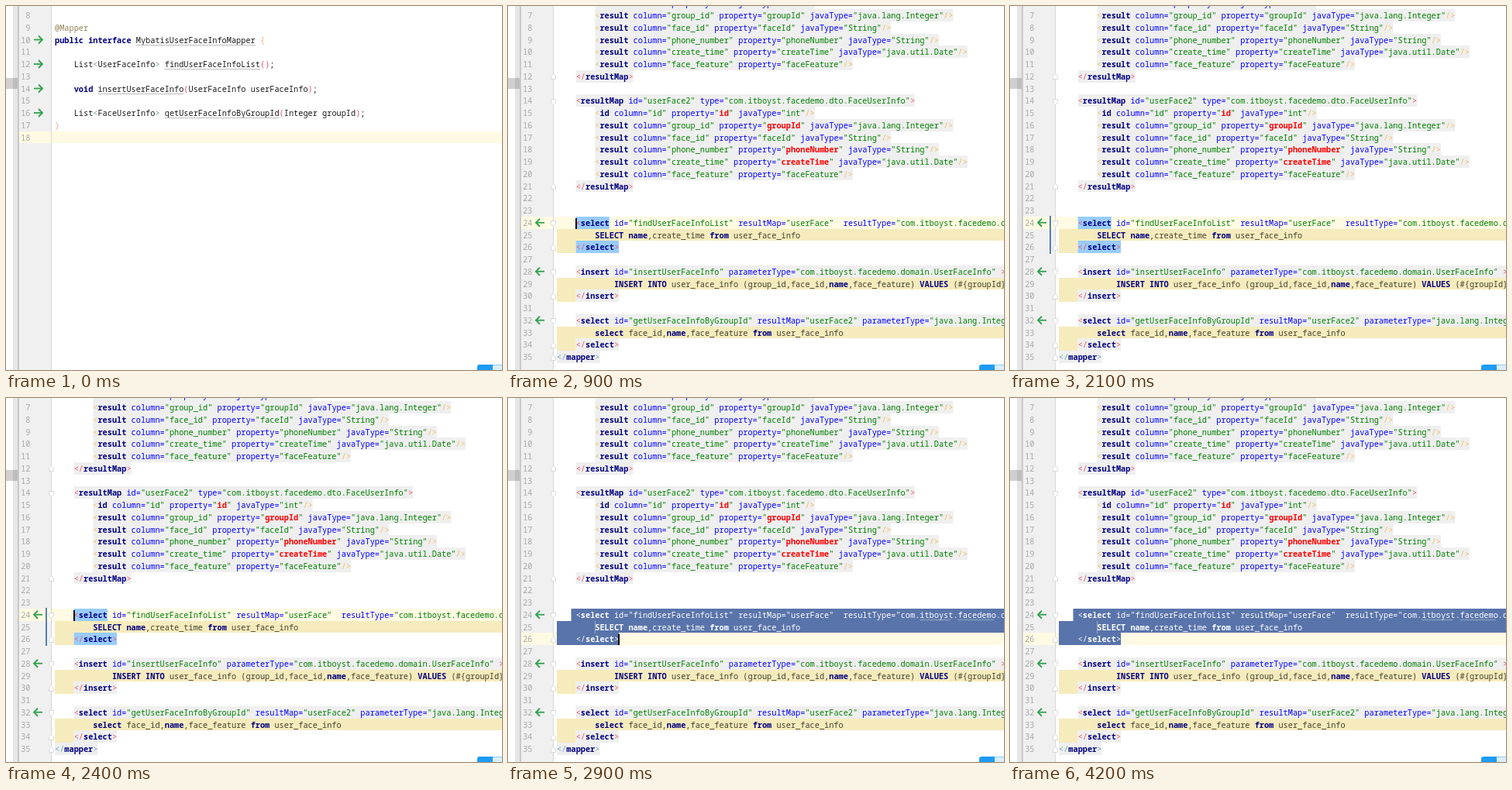
Write an HTML page with a canvas that moves like this. It is 640 px wide and 470 px high and loops after 4300 ms.

```html
<!DOCTYPE html>
<html lang="en">
<head>
<meta charset="utf-8">
<title>Mapper editor</title>
<style>
html, body { margin: 0; width: 100%; height: 100%; overflow: hidden; background: #fff; }
canvas { display: block; width: 640px; height: 470px; }
</style>
</head>
<body>
<canvas id="stage" width="640" height="470"></canvas>
<script>
const ctx = document.getElementById('stage').getContext('2d');
const LOOP = 4300, LEFT = 63, CHAR = 6.162, LINE = 15.75;
const FONT = '10.27px "Noto Sans Mono", "DejaVu Sans Mono", monospace';
const COLOR = {
  caretRow: '#fffae3', tag: '#efefef', sql: '#f6ebbc', match: '#99ccff', selection: '#5974ab',
  key: '#000080', attr: '#0000ff', value: '#008000', bad: '#ff0000', text: '#1c1c1c',
  paren: '#e0506e', brace: '#f7a58c', angle: '#6f9f83', note: '#94855a', arrow: '#2fa24b'
};

const java = {
  first: 8,
  arrows: [10, 12, 14, 16],
  lines: [
    '', '@Mapper', 'public interface MybatisUserFaceInfoMapper {', '',
    '    List<UserFaceInfo> findUserFaceInfoList();', '',
    '    void insertUserFaceInfo(UserFaceInfo userFaceInfo);', '',
    '    List<FaceUserInfo> getUserFaceInfoByGroupId(Integer groupId);', '}', ''
  ]
};

const result = (name, property, type) =>
  `        <result column="${name}" property="${property}"${type ? ` javaType="${type}"` : ''}/>`;
const fields = [
  result('group_id', 'groupId', 'java.lang.Integer'),
  result('face_id', 'faceId', 'String'),
  result('phone_number', 'phoneNumber', 'String'),
  result('create_time', 'createTime', 'java.util.Date'),
  result('face_feature', 'faceFeature')
];
const xml = {
  first: 7,
  arrows: [24, 28, 32],
  unresolved: [15, 16, 18, 19],
  foldStarts: [14, 24, 28, 32],
  foldEnds: [12, 21, 26, 30, 34, 35],
  lines: [
    ...fields, '    </resultMap>', '',
    '    <resultMap id="userFace2" type="com.itboyst.facedemo.dto.FaceUserInfo">',
    '        <id column="id" property="id" javaType="int"/>',
    ...fields, '    </resultMap>', '', '',
    '    <select id="findUserFaceInfoList" resultMap="userFace"  resultType="com.itboyst.facedemo.dto.FaceUserInfo">',
    '        SELECT name,create_time from user_face_info',
    '    </select>', '',
    '    <insert id="insertUserFaceInfo" parameterType="com.itboyst.facedemo.domain.UserFaceInfo" >',
    '            INSERT INTO user_face_info (group_id,face_id,name,face_feature) VALUES (#{groupId},#{faceId})',
    '    </insert>', '',
    '    <select id="getUserFaceInfoByGroupId" resultMap="userFace2" parameterType="java.lang.Integer">',
    '        select face_id,name,face_feature from user_face_info',
    '    </select>', '</mapper>'
  ]
};

// Drag selection: [time, row, column of its moving end]
const SELECT_FROM = { row: 17, col: 3 };
const DRAG = [[2600, 17, 3], [2700, 18, 9], [2800, 19, 11], [2900, 19, 13]];

const colX = col => LEFT + col * CHAR;
const rowTop = row => Math.round(4.1 + LINE * row);
const rowMid = row => 12.5 + LINE * row;
const baseline = row => Math.round(16 + LINE * row);
const within = (t, from, to) => t >= from && t < to;

function box(x, y, w, h, color) {
  ctx.fillStyle = color;
  ctx.fillRect(x, y, w, h);
}

function rowBox(row, x1, x2, color) {
  box(x1, rowTop(row), x2 - x1, rowTop(row + 1) - rowTop(row), color);
}

function stroke(points, color, width = 1) {
  ctx.beginPath();
  points.forEach(([x, y]) => ctx.lineTo(x, y));
  ctx.strokeStyle = color;
  ctx.lineWidth = width;
  ctx.stroke();
}

function write(text, x, y, color, bold) {
  ctx.font = (bold ? 'bold ' : '') + FONT;
  ctx.fillStyle = color;
  ctx.fillText(text, x, y);
}

// Splits a line into { text, col, color, bold, underline } pieces.
function tokenize(line, pattern, style) {
  return [...line.matchAll(pattern)].map(m => ({ text: m[0], col: m.index, ...style(m[0], m.index) }));
}

function javaTokens(line) {
  return tokenize(line, /@?\w+|[^\w\s]/g, word => {
    if (/^(public|interface|void)$/.test(word)) return { color: COLOR.key, bold: true };
    if (word[0] === '@') return { color: COLOR.note };
    if (/[{}]/.test(word)) return { color: COLOR.brace };
    if (/[()]/.test(word)) return { color: COLOR.paren };
    if (/[<>]/.test(word)) return { color: COLOR.angle };
    return { color: COLOR.text, underline: /^(Mybatis|find|insert|get)/.test(word) };
  });
}

function sqlTokens(line) {
  return tokenize(line, /INSERT INTO|\w+|[^\w\s]/g, word =>
    /^(select|insert into|from|values|name)$/i.test(word)
      ? { color: COLOR.key, bold: true } : { color: '#45402f' });
}

function xmlTokens(line, unresolved) {
  const bracket = { 0: '#6fa3c4', 4: '#ee5566', 8: '#f2bd62' }[line.search(/\S/)];
  let isProperty = false;
  return tokenize(line, /<\/?|\/?>|\w+=|"|[\w.]+/g, (word, at) => {
    if (/[<>]/.test(word)) return { color: bracket };
    if (word.endsWith('=')) {
      isProperty = word === 'property=';
      return { color: COLOR.attr };
    }
    if (/[</]/.test(line[at - 1])) return { color: COLOR.key, bold: true };
    if (unresolved && isProperty && word !== '"') return { color: COLOR.bad, bold: true };
    return { color: COLOR.value };
  });
}

java.tokens = java.lines.map(javaTokens);
xml.tokens = xml.lines.map((line, row) =>
  /^\s*</.test(line) ? xmlTokens(line, xml.unresolved.includes(row + xml.first)) : sqlTokens(line));

function drawText(doc, color) {
  doc.tokens.forEach((tokens, row) => tokens.forEach(token => {
    write(token.text, colX(token.col), baseline(row), color || token.color, token.bold);
    if (token.underline)
      box(colX(token.col), baseline(row) + 2, token.text.length * CHAR, 1, '#b9b9b9');
  }));
}

function drawArrow(row, dir) {
  const y = rowMid(row) - 0.5, tip = 41.5 + 5.5 * dir, tail = 41.5 - 5.5 * dir;
  stroke([[tail, y], [tip - dir, y]], COLOR.arrow, 1.8);
  stroke([[tip - 5 * dir, y - 5], [tip, y], [tip - 5 * dir, y + 5]], COLOR.arrow, 1.8);
}

function drawFold(row, dir) {
  const y = Math.round(rowMid(row)) + 0.5;
  ctx.beginPath();
  [[-3, -3], [3, -3], [3, 1], [0, 4], [-3, 1]].forEach(([dx, dy]) => ctx.lineTo(58.5 + dx, y + dy * dir));
  ctx.closePath();
  ctx.fillStyle = '#fff';
  ctx.fill();
  ctx.strokeStyle = '#d9d9d9';
  ctx.lineWidth = 1;
  ctx.stroke();
}

function drawFrame(caretRow) {
  box(0, 0, 640, 470, '#fff');
  box(9, 0, 7, 470, '#e6e6e6');
  box(0, 93, 9, 14, '#d0d0d0');
  box(9, 93, 7, 14, '#bdbdbd');
  box(15, 0, 2, 470, '#c9c9c9');
  box(17, 0, 41, 470, '#f0f0f0');
  rowBox(caretRow, 17, 640, COLOR.caretRow);
  box(58, 0, 1, 470, '#d8d8d8');
}

function drawGutter(doc, dir) {
  doc.lines.forEach((_, row) => {
    const label = String(row + doc.first);
    write(label, 31.5 - label.length * CHAR, baseline(row), '#a8a8a8');
  });
  doc.arrows.forEach(n => drawArrow(n - doc.first, dir));
}

function drawXmlBacks(caretRow) {
  xml.lines.forEach((line, row) => {
    if (!line || row === caretRow) return;
    const start = colX(line.search(/\S/));
    if (!/^\s*</.test(line)) {
      rowBox(row, LEFT, 640, COLOR.sql);
      rowBox(row + 1, LEFT, colX(4), COLOR.sql);
    } else {
      rowBox(row, start, colX(line.length), COLOR.tag);
    }
  });
}

// The line scrolled almost out of view above the first full one.
function drawLineAbove() {
  const line = '        <id column="id" property="id" javaType="int"/>';
  rowBox(-1, colX(8), colX(line.length), COLOR.tag);
  xmlTokens(line).forEach(token => write(token.text, colX(token.col), baseline(-1), token.color, token.bold));
}

function drawCaret(row, col) {
  box(Math.round(colX(col)) - (col ? 1 : 0), rowTop(row) + 2, 2, 14, '#000');
}

function drawSelection(end) {
  const rects = [];
  for (let row = SELECT_FROM.row; row <= end.row; row++) {
    const x1 = row === SELECT_FROM.row ? colX(SELECT_FROM.col) : LEFT;
    rects.push([row, x1, row === end.row ? colX(end.col) : 640]);
  }
  ctx.save();
  ctx.beginPath();
  rects.forEach(([row, x1, x2]) => {
    rowBox(row, x1, x2, COLOR.selection);
    ctx.rect(x1, rowTop(row), x2 - x1, rowTop(row + 1) - rowTop(row));
  });
  ctx.clip();
  drawText(xml, '#fff');
  box(112, rowTop(18), 1, 16, '#9aabce');
  const line = xml.lines[17];
  ['itboyst', 'facedemo'].forEach(word => {
    const x = colX(line.indexOf(word));
    const zigzag = Array.from({ length: word.length * 3 }, (_, i) => [x + i * 2, baseline(17) + 2 + i % 2]);
    stroke(zigzag, '#a9c3c0', 0.8);
  });
  ctx.restore();
}

function drawCorner() {
  box(628, 463, 12, 7, '#d9eefc');
  ctx.beginPath();
  ctx.roundRect(608, 463, 20, 10, [3, 0, 0, 0]);
  ctx.fillStyle = '#1e9bf5';
  ctx.fill();
  box(628, 463, 12, 1, '#8fcaf5');
}

function drawJava(t) {
  drawFrame(10);
  drawGutter(java, 1);
  drawText(java);
  if (t >= 800) drawCaret(10, 0);
}

function drawXml(t) {
  const step = DRAG.filter(([time]) => t >= time).pop();
  const end = step && { row: step[1], col: step[2] };
  const caretRow = end ? end.row : 17;
  drawFrame(caretRow);
  drawLineAbove();
  drawXmlBacks(caretRow);
  if (!end) {
    rowBox(17, colX(4), colX(11), COLOR.match);
    rowBox(19, colX(4), colX(13), COLOR.match);
  }
  drawGutter(xml, -1);
  xml.foldStarts.forEach(n => drawFold(n - xml.first, 1));
  xml.foldEnds.forEach(n => drawFold(n - xml.first, -1));
  drawText(xml);
  if (end) drawSelection(end);
  if (within(t, 1200, 2600)) box(51, 271, 2, 49, '#5580ad');

  const hidden = within(t, 1800, 2300) || within(t, 3600, 4100) || t >= 4200;
  if (!hidden) drawCaret(caretRow, end ? end.col : 4);
}

function render(t) {
  if (t < 900) drawJava(t); else drawXml(t);
  drawCorner();
}

const start = performance.now();
function tick() {
  render((performance.now() - start) % LOOP);
  requestAnimationFrame(tick);
}
tick();
</script>
</body>
</html>
```
